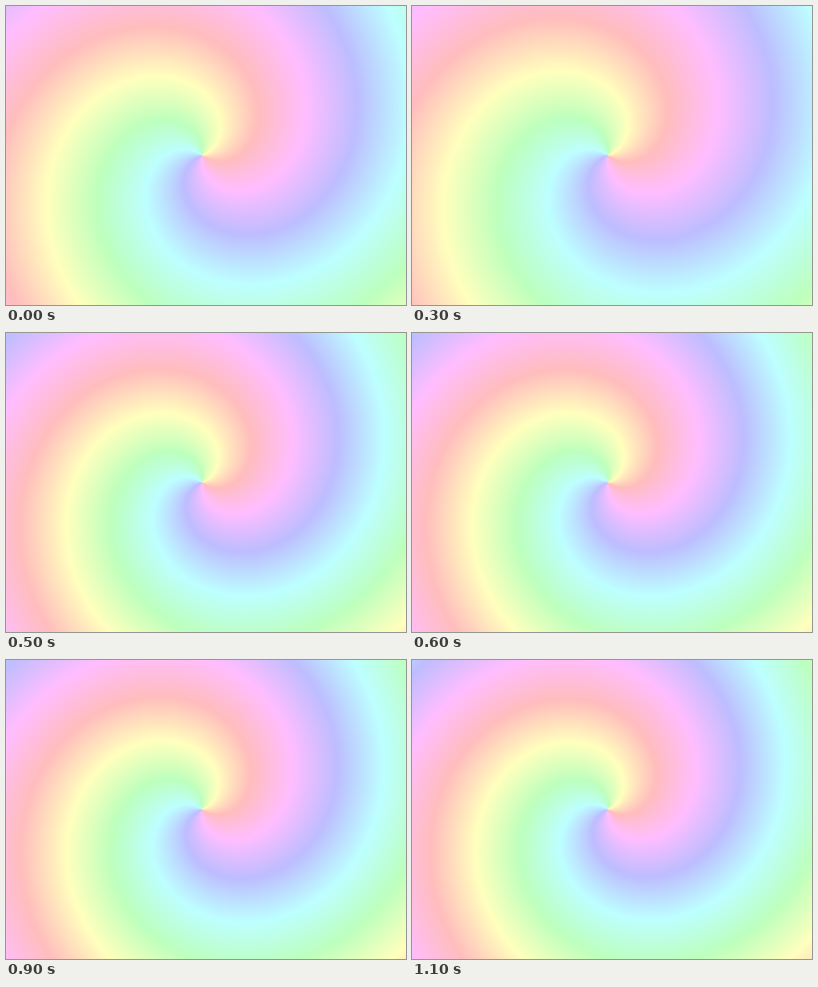
An HTML page with a canvas for the animation above (1.2 s loop, 400x299 px).

```html
<!DOCTYPE html>
<html lang="en">
<head>
<meta charset="utf-8">
<title>Pastel spiral</title>
<style>
  html, body { margin: 0; width: 100%; height: 100%; overflow: hidden; }
  canvas { display: block; width: 400px; height: 299px; }
</style>
</head>
<body>
<canvas id="stage" width="400" height="299"></canvas>
<script>
  const W = 400, H = 299, CX = 195.5, CY = 149;
  const STEP = 100;
  const LOW = 189; // darkest channel value of the pastel wheel
  const START_HUE = 40;
  // How tightly the spiral is wound at each step, in degrees per pixel
  const TWISTS = [1.09, 1.04, 1.01, 1.025, 1.14, 1.245, 1.245, 1.06, 1.095, 1.25, 1.01, 1.28];

  const ctx = document.getElementById('stage').getContext('2d');
  const image = ctx.createImageData(W, H);
  const angles = new Float32Array(W * H);
  const radii = new Float32Array(W * H);

  for (let y = 0, i = 0; y < H; y++) {
    for (let x = 0; x < W; x++, i++) {
      const dx = x - CX, dy = CY - y;
      angles[i] = Math.atan2(dy, dx) * 180 / Math.PI + START_HUE;
      radii[i] = Math.hypot(dx, dy);
    }
  }

  // One colour channel of the wheel, peaking at hue 0
  function channel(hue) {
    const turn = ((hue % 360) + 360) % 360;
    const distance = Math.min(turn, 360 - turn);
    const level = Math.max(0, Math.min(1, 2 - distance / 60));
    return Math.round(LOW + (255 - LOW) * level);
  }

  const wave = Uint8Array.from({ length: 3600 }, (_, i) => channel(i / 10));

  function draw(twist) {
    const px = image.data;
    for (let i = 0, p = 0; i < angles.length; i++, p += 4) {
      const h = Math.round((angles[i] - twist * radii[i] + 1080) * 10);
      px[p] = wave[h % 3600];
      px[p + 1] = wave[(h + 2400) % 3600];
      px[p + 2] = wave[(h + 1200) % 3600];
      px[p + 3] = 255;
    }
    ctx.putImageData(image, 0, 0);
  }

  const start = performance.now();
  let shown = -1;

  function tick() {
    const step = Math.floor((performance.now() - start) / STEP) % TWISTS.length;
    if (step !== shown) {
      draw(TWISTS[step]);
      shown = step;
    }
    requestAnimationFrame(tick);
  }
  tick();
</script>
</body>
</html>
```
